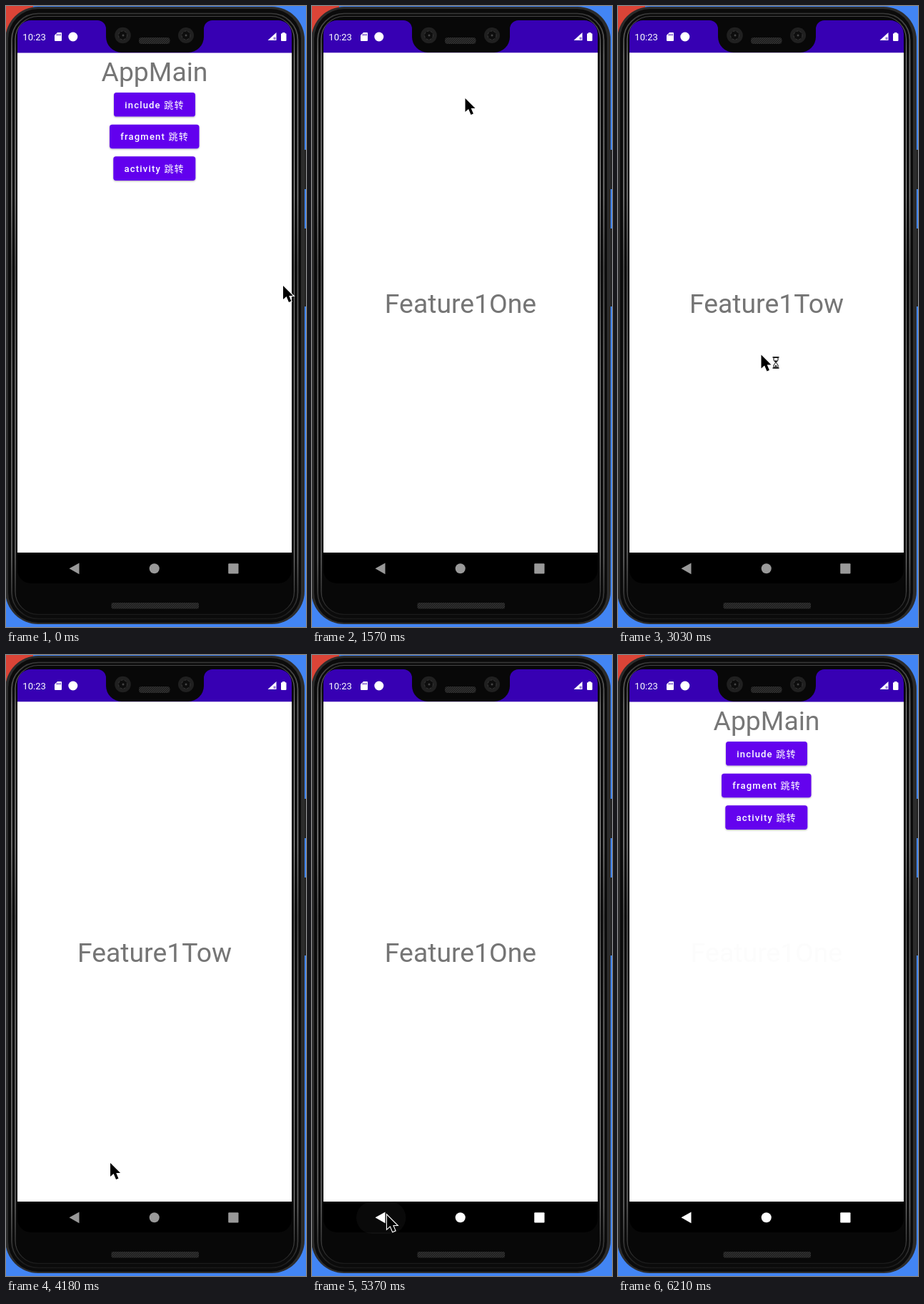
Animation of 420 by 868 pixels, one loop 6670 ms. Source, as an HTML page:

```html
<!DOCTYPE html>
<html lang="zh-CN">
<head>
<meta charset="utf-8">
<style>
html, body { margin: 0; width: 100%; height: 100%; overflow: hidden; background: #4285f4; }
svg { display: block; width: 420px; height: 868px; }
text { font-family: Roboto, "Noto Sans CJK SC", "Noto Sans CJK", sans-serif; }
.title { font-size: 37.33px; fill: #757575; text-anchor: middle; }
.label { font-size: 13.07px; font-weight: 500; letter-spacing: 1.167px; fill: #fff; }
.label tspan { font-weight: 400; }
</style>
</head>
<body>
<svg viewBox="0 0 420 868">
  <defs>
    <linearGradient id="shine" x2="0" y2="1">
      <stop stop-color="#444"/><stop offset=".07" stop-color="#8a8a8a"/>
      <stop offset=".3" stop-color="#a0a0a0"/><stop offset=".42" stop-color="#666"/>
      <stop offset=".6" stop-color="#8c8c8c"/><stop offset=".9" stop-color="#808080"/>
      <stop offset="1" stop-color="#1c1c1c"/>
    </linearGradient>
    <pattern id="mesh" width="3" height="3" patternUnits="userSpaceOnUse">
      <rect width="3" height="3" fill="#303030"/><path d="M0 3L3 0" stroke="#151515"/>
    </pattern>
    <clipPath id="screen"><rect x="16" y="20" width="384" height="787" rx="19"/></clipPath>
    <filter id="shadow"><feDropShadow dx="0" dy="1" stdDeviation="1" flood-opacity=".3"/></filter>
  </defs>

  <rect width="420" height="868" fill="#4285f4"/>
  <rect width="38" height="40" fill="#db4437"/>

  <!-- handset -->
  <path d="M415 201h5v55h-5zM415 311h5v109h-5z" fill="#222"/>
  <rect x="-1" y="1" width="419" height="863" rx="46" fill="#2c2c2c"/>
  <rect x="3" y="4" width="410" height="858" rx="42" fill="#0b0b0b"/>
  <g fill="none" stroke="url(#shine)">
    <rect x="8" y="10.5" width="400.5" height="846" rx="37" stroke-width="1.6" opacity=".8"/>
    <rect x="13" y="14.5" width="390.5" height="836" rx="32" stroke-width="1.2"/>
  </g>
  <rect x="14" y="16" width="388.5" height="833" rx="30" fill="#080808"/>

  <g clip-path="url(#screen)">
    <rect x="16" y="20" width="384" height="787"/>
    <rect x="16" y="20" width="384" height="46" fill="#3700b3"/>
    <rect x="16" y="65.5" width="384" height="698.5" fill="#fff"/>
    <text class="title" x="208" y="104.5">AppMain</text>
    <g id="buttons"></g>
    <g id="feature">
      <rect x="16" y="65.5" width="384" height="698.5" fill="#fff"/>
      <text id="name" class="title" x="208" y="429.2"></text>
    </g>
  </g>

  <!-- notch -->
  <path d="M128 19V20A12 12 0 0 1 140 32V43A22 22 0 0 0 162 65H255A22 22 0 0 0 277 43V32A12 12 0 0 1 289 20V19Z" fill="#080808"/>
  <g fill="#202020">
    <circle cx="163.5" cy="41" r="11.3"/><circle cx="252" cy="41" r="11"/>
    <g fill="#0d0d0d" stroke="#383838" stroke-dasharray="3 2">
      <circle cx="163.5" cy="41" r="6"/><circle cx="252" cy="41" r="6"/>
    </g>
    <circle cx="164" cy="41" r="1.5" fill="#444"/><circle cx="252" cy="41" r="1.5" fill="#444"/>
  </g>
  <rect x="186" y="44" width="43.5" height="9" rx="4" fill="url(#mesh)"/>
  <rect x="147.5" y="834" width="122.5" height="8.5" rx="2" fill="url(#mesh)"/>

  <!-- status bar -->
  <g fill="#fff">
    <text x="23.3" y="47.7" font-size="13.07">10:23</text>
    <path d="M72 37h5q1 0 1 1v10q0 1-1 1h-8q-1 0-1-1v-7z"/>
    <path d="M71.5 39v2.5M73.8 39v2.5M76 39v2.5" stroke="#3700b3"/>
    <circle cx="93.8" cy="43" r="6.5"/>
    <path d="M378.5 37v11h-12z"/>
    <path d="M374.5 43.5h3v3.5h-3z" fill="#3700b3" opacity=".5"/>
    <path d="M387 37h3.5v1.2h1q1 0 1 1v8.8q0 1-1 1h-5.5q-1 0-1-1v-8.8q0-1 1-1h1z"/>
  </g>

  <!-- navigation bar -->
  <rect id="ripple" y="764" height="45" rx="22.5" fill="#fff"/>
  <g id="nav">
    <path d="M88.5 786.3L102.5 778.5V794.2Z"/>
    <circle cx="207.7" cy="786.3" r="7"/>
    <rect x="311.2" y="779.2" width="14.3" height="14.3" rx="1"/>
  </g>

  <g id="cursor">
    <path d="M0 0V19L4.6 15 8 23 11.4 21.6 8.2 14H14Z" stroke="#fff" stroke-width="2.2" paint-order="stroke"/>
    <g id="busy" fill="#fff" stroke="#000">
      <path d="M17.5 4v3.500l2.500 3.500-2.500 3.500v3.500h6v-3.500l-2.500-3.500 2.500-3.500v-3.500z"/>
      <path d="M16 3.500h9M16 18.500h9" stroke-width="1.600"/>
      <path d="M18.500 8h4L20.500 11zM18.500 17l2-3 2 3z" fill="#000" stroke="none"/>
    </g>
  </g>
</svg>
<script>
const LOOP = 6670;
const $ = id => document.getElementById(id);
const clamp = v => Math.max(0, Math.min(1, v));

$('buttons').innerHTML = [
  ['include', 151, 121, 114], ['fragment', 145, 165.7, 125.5], ['activity', 150.3, 210.3, 115]
].map(([word, x, y, w]) =>
  `<rect x="${x}" y="${y}" width="${w}" height="33.6" rx="3.7" fill="#6200ee" filter="url(#shadow)"/>
   <text class="label" x="${x + 15.2}" y="${y + 21.6}">${word} <tspan>跳转</tspan></text>`
).join('');

function steps(t, a, b, n) {
  if (t < a) return 0;
  if (t >= b) return 1;
  return (Math.floor((t - a) / (b - a) * (n - 1) + 1e-6) + 1) / n;
}

// start, end, step count, destination of the pointer tip
const moves = [
  [610, 930, 5, 227, 121],
  [1100, 1101, 1, 216.5, 124.5],
  [1175, 1250, 2, 214.5, 129],
  [2030, 2335, 5, 222, 521],
  [2410, 2490, 2, 203, 470],
  [2640, 2720, 2, 189, 418],
  [2800, 2880, 2, 200.5, 487.5],
  [3790, 4410, 9, 127, 788],
  [4500, 4650, 3, 105, 783],
  [5600, 5980, 6, 316, 847],
  [6060, 6135, 2, 331, 860],
  [6210, 6211, 1, 340, 880]
];

function pointer(t) {
  let x = 388, y = 391;
  for (const [a, b, n, toX, toY] of moves) {
    const p = steps(t, a, b, n), e = p * p * (3 - 2 * p);
    x += (toX - x) * e;
    y += (toY - y) * e;
  }
  return [x, y];
}

function drawRipple(t) {
  const age = t - (t < 5370 ? 4820 : 5370);
  const half = 49.5 - 15 * Math.exp(-age / 70);
  const alpha = age < 0 ? 0 : .17 * clamp(.2 + age / 120) * clamp((390 - age) / 180);
  $('ripple').setAttribute('x', 96.7 - half);
  $('ripple').setAttribute('width', 2 * half);
  $('ripple').setAttribute('opacity', alpha);
}

function draw() {
  const t = performance.now() % LOOP;

  const shown = steps(t, 1400, 1570, 3);
  const left = t < 5440 ? 1 : t < 5500 ? .4 : .01;
  $('feature').setAttribute('opacity', shown * left);
  $('name').textContent = t >= 3030 && t < 4890 ? 'Feature1Tow' : 'Feature1One';

  const tone = Math.round(153 + 102 * steps(t, 4820, 5100, 4));
  $('nav').setAttribute('fill', `rgb(${tone},${tone},${tone})`);
  drawRipple(t);

  $('cursor').setAttribute('transform', `translate(${pointer(t)})`);
  $('busy').setAttribute('visibility', t >= 2880 && t < 3790 ? 'visible' : 'hidden');
  requestAnimationFrame(draw);
}
draw();
</script>
</body>
</html>
```
